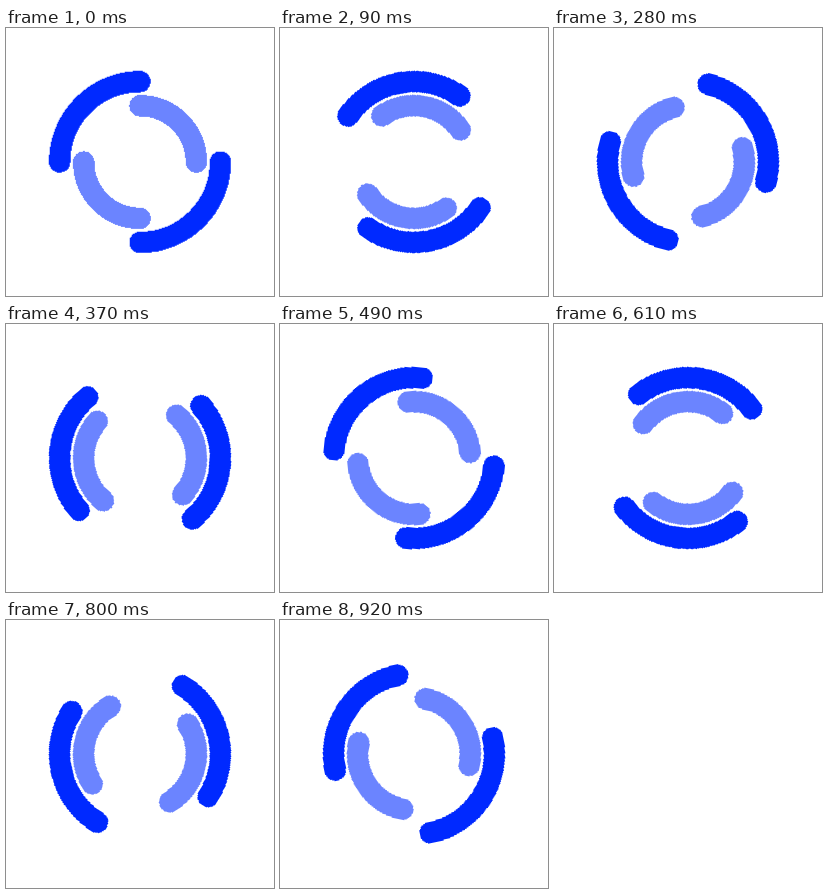
An HTML page for the animation above (950 ms loop, 268 by 268 pixels).

```html
<!DOCTYPE html>
<html lang="en">
<head>
<meta charset="utf-8">
<title>Double ring spinner</title>
<style>
  html, body {
    margin: 0;
    height: 100%;
    overflow: hidden;
    background: #fff;
  }
  svg {
    display: block;
    width: 100vw;
    height: 100vh;
  }
  .ring {
    fill: none;
    stroke-width: 8;
    stroke-linecap: round;
    shape-rendering: crispEdges;
    transform-origin: 50px 50px;
    animation: spin 950ms infinite;
  }
  .outer {
    --step: calc(360deg / 31);
    stroke: #0029ff;
  }
  .inner {
    --step: calc(-360deg / 31);
    stroke: #6b84ff;
  }
  /* 31 poses of 30 ms; poses 6 and 20 stay 40 ms */
  @keyframes spin {
    0%     { transform: rotate(0deg); animation-timing-function: steps(6); }
    18.94% { transform: rotate(calc(var(--step) * 6)); animation-timing-function: steps(1); }
    23.15% { transform: rotate(calc(var(--step) * 7)); animation-timing-function: steps(13); }
    64.2%  { transform: rotate(calc(var(--step) * 20)); animation-timing-function: steps(1); }
    68.4%  { transform: rotate(calc(var(--step) * 21)); animation-timing-function: steps(10); }
    100%   { transform: rotate(calc(var(--step) * 31)); }
  }
</style>
</head>
<body>
<svg viewBox="0 0 100 100">
  <path class="ring outer" d="M20 50A30 30 0 0 1 50 20M80 50A30 30 0 0 1 50 80"/>
  <path class="ring inner" d="M50 29A21 21 0 0 1 71 50M50 71A21 21 0 0 1 29 50"/>
</svg>
</body>
</html>
```
